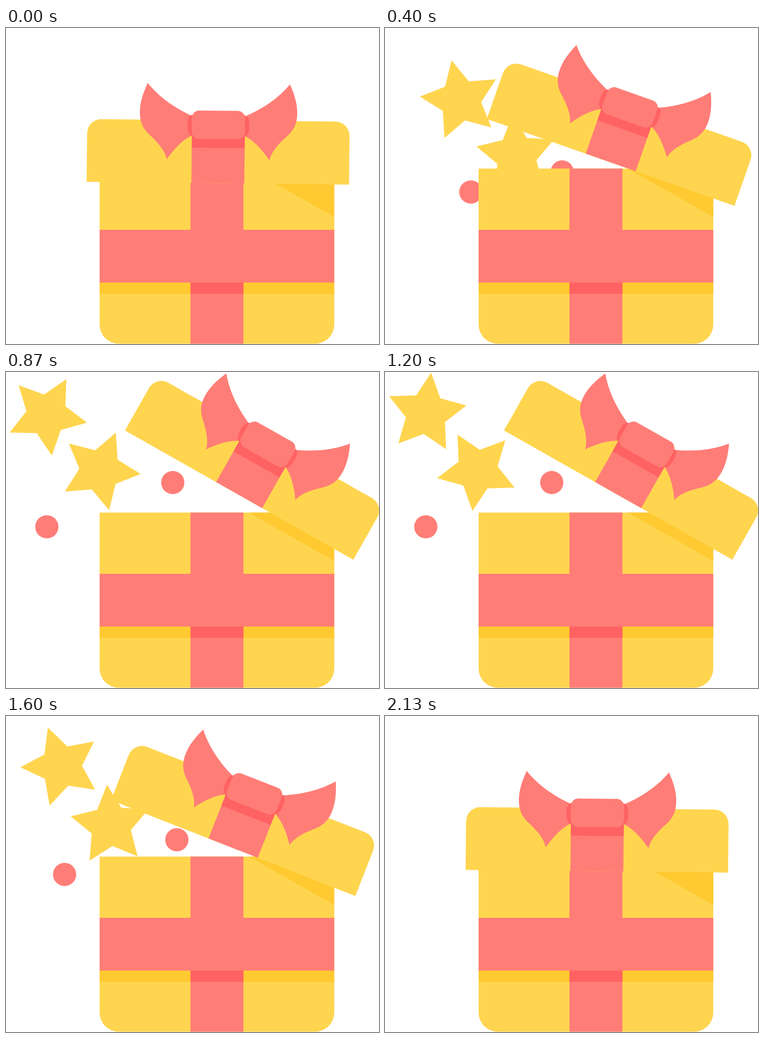
Animation of 813x689 px, one loop 2390 ms. Source, as an HTML page:

```html
<!DOCTYPE html>
<html lang="en">
<head>
<meta charset="utf-8">
<title>Gift box</title>
<style>
  html, body { margin: 0; width: 100%; height: 100%; overflow: hidden; background: #fff; }
  svg { display: block; width: 813px; height: 689px; }
  .gold { fill: #ffd54f; }
  .amber { fill: #ffc931; }
  .pink { fill: #ff7d77; }
  .red { fill: #ff6262; }
</style>
</head>
<body>
<svg viewBox="0 0 813 689">
  <defs>
    <g id="wing">
      <path class="pink" d="M-56-145.500C-95-162-132-188-155-217C-166-193-172-172-171.500-151C-171-130-163-116-151-105C-131-87-116-70-112-51C-95-75-78-94-56-104Z"/>
      <path class="red" d="M-56-148C-64-148-67.500-139-67.500-126C-67.500-112-64-102-56-102Z"/>
    </g>
  </defs>

  <g id="confetti"></g>

  <g id="box">
    <path class="gold" d="M204 306.500H715.500V646.500A42 42 0 0 1 673.500 688.500H246A42 42 0 0 1 204 646.500Z"/>
    <path class="amber" d="M529.500 306.500H715.500V412Z"/>
    <rect class="amber" x="204" y="555" width="511.500" height="24.500"/>
    <rect class="pink" x="402" y="306.500" width="115.500" height="382"/>
    <rect class="red" x="402" y="555" width="115.500" height="24.500"/>
    <rect class="pink" x="204" y="440" width="511.500" height="115"/>
  </g>

  <g id="lid">
    <path class="gold" d="M-286 0V-106A31 31 0 0 1 -255-137H255A31 31 0 0 1 286-106V0Z"/>
    <rect class="pink" x="-57.700" y="-110" width="115.400" height="110"/>
    <rect class="red" x="-57.700" y="-110" width="115.400" height="33"/>
    <use href="#wing"/>
    <use href="#wing" transform="scale(-1 1)"/>
    <rect class="pink" x="-58" y="-158" width="116" height="62" rx="16"/>
  </g>
</svg>

<script>
const LOOP = 2390, STEP = 1000 / 15, LAST_STEP = 32;
const confetti = document.getElementById('confetti');
const lid = document.getElementById('lid');

// Resting place when open, path back into the box, and spin (degrees, degrees per ms).
const pieces = [
  { x: 80.1, y: 89.1, dx: 320, dy: 242, angle: -11.1, spin: -0.0655, star: [9.3, 3] },
  { x: 203.4, y: 205, dx: 310, dy: 263, angle: 24.9, spin: 0.06, star: [2.1, 9.4] },
  { x: 363.5, y: 241, dx: 91, dy: 293, angle: 0, spin: 0 },
  { x: 89, y: 337.5, dx: 394, dy: 81, angle: 0, spin: 0 }
];

function add(tag, attrs) {
  const el = document.createElementNS('http://www.w3.org/2000/svg', tag);
  for (const key in attrs) el.setAttribute(key, attrs[key]);
  return confetti.appendChild(el);
}

function starPoints([cx, cy]) {
  return Array.from({ length: 10 }, (_, i) => {
    const r = i % 2 ? 45 : 89.3, a = i * Math.PI / 5;
    return `${(cx + r * Math.cos(a)).toFixed(2)},${(cy + r * Math.sin(a)).toFixed(2)}`;
  }).join(' ');
}

for (const p of pieces) {
  p.el = p.star
    ? add('polygon', { class: 'gold', points: starPoints(p.star) })
    : add('circle', { class: 'pink', r: 25.3 });
}

function ease(time, start, duration) {
  const x = Math.min(1, Math.max(0, (time - start) / duration));
  return x * x * (3 - 2 * x);
}

function place(el, x, y, angle) {
  el.setAttribute('transform', `translate(${x} ${y}) rotate(${angle})`);
}

function draw(ms) {
  // The motion runs at 15 steps a second, then rests closed.
  const time = Math.min(LAST_STEP, Math.floor((ms % LOOP + 4) / STEP)) * STEP;

  const open = ease(time, 0, 667) - ease(time, 1367, 667);
  place(lid, 461.7 + 46.5 * open, 338.4 - 70 * open, 0.6 + 28.92 * open);

  const inside = 1 - ease(time, 0, 593) + ease(time, 1485, 593);
  for (const p of pieces) {
    place(p.el, p.x + p.dx * inside, p.y + p.dy * inside, p.angle + p.spin * (time - 1200));
  }
}

let begin;
function tick(now) {
  begin ??= now;
  draw(now - begin);
  requestAnimationFrame(tick);
}
draw(0);
requestAnimationFrame(tick);
</script>
</body>
</html>
```
